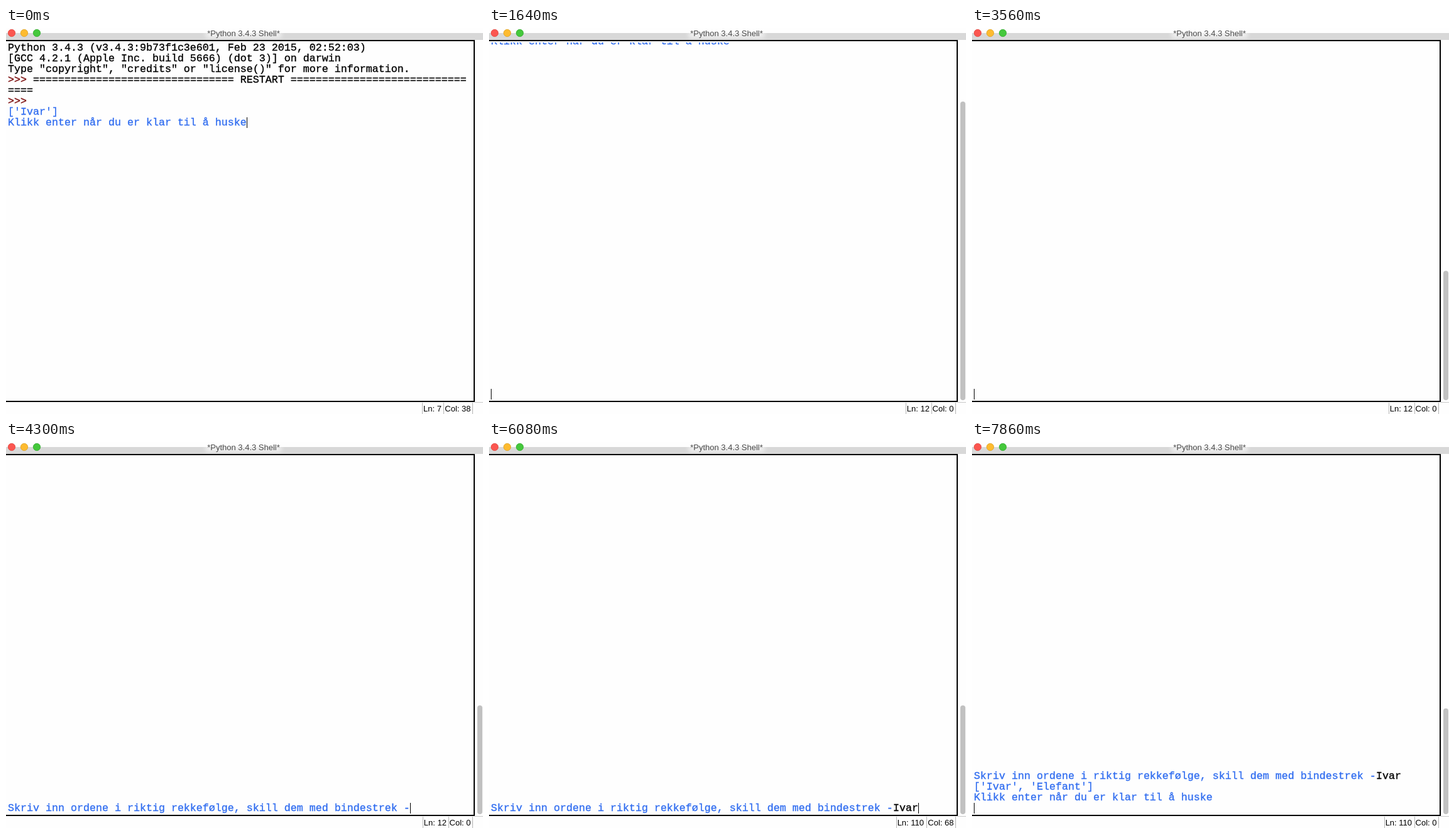
These frames come from a looping animation (759 by 614 pixels, 8 s). An HTML page:

```html
<!DOCTYPE html>
<html lang="no">
<head>
<meta charset="utf-8">
<title>Python Shell</title>
<style>
  html, body { margin: 0; width: 100%; height: 100%; overflow: hidden; background: #fefefe; }
  svg { display: block; width: 759px; height: 614px; }
  text { white-space: pre; }
  .mono { font: 16.667px "Liberation Mono", monospace; stroke-width: .35px; }
  .ui { font: 13px "Liberation Sans", sans-serif; }
  .black { fill: #000; stroke: #000; }
  .red { fill: #7d1010; stroke: #7d1010; }
  .blue { fill: #306df0; stroke: #306df0; }
</style>
</head>
<body>
<svg viewBox="0 0 759 614">
  <defs>
    <clipPath id="view"><rect x="0" y="23" width="743" height="569"/></clipPath>
    <filter id="soft" x="-10%" y="-60%" width="120%" height="220%"><feGaussianBlur stdDeviation="3"/></filter>
  </defs>
  <rect width="759" height="614" fill="#fefefe"/>
  <rect y="8" width="759" height="11" fill="#d8d8d8"/>
  <rect x="318" y="5" width="120" height="11" fill="#fff" opacity=".6" filter="url(#soft)"/>
  <circle cx="9" cy="8" r="5.7" fill="#fb5650" stroke="#e0443e" stroke-width=".8"/>
  <circle cx="29" cy="8" r="5.7" fill="#fdbb30" stroke="#dea123" stroke-width=".8"/>
  <circle cx="49" cy="8" r="5.7" fill="#45c83c" stroke="#2fa92b" stroke-width=".8"/>
  <text class="ui" x="378" y="13" text-anchor="middle" fill="#4a4a4a">*Python 3.4.3 Shell*</text>
  <path d="M0 20H745V594H0" fill="none" stroke="#000" stroke-width="2"/>
  <path d="M746 595.5H759" stroke="#c8c8c8"/>
  <g clip-path="url(#view)">
    <g id="page"></g>
  </g>
  <rect id="thumb" x="750" width="8" rx="4" fill="#c1c1c1"/>
  <path id="cells" fill="none" stroke="#b4b4b4"/>
  <text id="ln" class="ui" y="610"></text>
  <text id="col" class="ui" y="610"></text>
</svg>
<script>
const LOOP = 8000, STEP = 148.1;
const LEFT = 3, TOP = 23, CHAR = 10, ROW = 17, LAST_ROW = 574;
const NAME = "Ivar";
const ASK = "Klikk enter når du er klar til å huske";
const PROMPT = "Skriv inn ordene i riktig rekkefølge, skill dem med bindestrek -";
const PROMPT_ROW = 109;

const $ = id => document.getElementById(id);
const page = $("page");

function make(tag, attrs) {
  const el = document.createElementNS("http://www.w3.org/2000/svg", tag);
  for (const key in attrs) el.setAttribute(key, attrs[key]);
  return page.appendChild(el);
}

function write(row, color, str, col = 0) {
  const el = make("text", {
    class: "mono " + color, x: LEFT + col * CHAR, y: TOP + 13 + row * ROW
  });
  el.textContent = str;
  return el;
}

const show = (el, on) => el.setAttribute("visibility", on ? "visible" : "hidden");

write(0, "black", "Python 3.4.3 (v3.4.3:9b73f1c3e601, Feb 23 2015, 02:52:03)");
write(1, "black", "[GCC 4.2.1 (Apple Inc. build 5666) (dot 3)] on darwin");
write(2, "black", 'Type "copyright", "credits" or "license()" for more information.');
write(3, "red", ">>>");
write(3, "black", "=".repeat(32) + " RESTART " + "=".repeat(28), 4);
write(4, "black", "====");
write(5, "red", ">>>");
write(6, "blue", `['${NAME}']`);
write(7, "blue", ASK);

const prompt = write(PROMPT_ROW, "blue", PROMPT);
const answer = write(PROMPT_ROW, "black", "", PROMPT.length);
const list = write(PROMPT_ROW + 1, "blue", `['${NAME}', 'Elefant']`);
const askAgain = write(PROMPT_ROW + 2, "blue", ASK);
const caret = make("rect", { width: 1, height: ROW, fill: "#000" });

// Last [step, value] pair whose step has been reached
const pick = (k, pairs) => pairs.filter(p => p[0] <= k).pop()[1];

// Number of rows on the page: the program prints blank lines at a steady rate
function rowCount(k) {
  if (k < 6) return 8;
  if (k < 9) return 12 + Math.round((k - 6) * 19 / 3);
  if (k < 11) return 31 + (k - 9) * 5;
  if (k < 29) return 41 + (k - 11) * 4;
  return pick(k, [[29, 110], [43, 111], [44, 112], [53, 113]]);
}

function drawStatus(line, col) {
  const ln = "Ln: " + line, cl = "Col: " + col;
  const colX = 739.5 - 26.73 - 7.23 * String(col).length;
  const split = Math.round(colX - 2);
  const lnX = split - 3 - 21.68 - 7.23 * String(line).length;
  const edge = Math.round(lnX - 2);
  $("ln").textContent = ln;
  $("ln").setAttribute("x", lnX);
  $("col").textContent = cl;
  $("col").setAttribute("x", colX);
  $("cells").setAttribute("d", [edge, split, 742].map(x => `M${x + .5} 596V614`).join(""));
}

function draw(t) {
  const k = Math.floor((t + 5) / STEP);
  const rows = rowCount(k);
  const scroll = Math.max(0, TOP + (rows - 1) * ROW - LAST_ROW);
  page.setAttribute("transform", `translate(0 ${-scroll})`);

  const typed = pick(k, [[0, 0], [34, 1], [36, 2], [39, 3], [40, 4]]);
  answer.textContent = NAME.slice(0, typed);
  show(prompt, k >= 29);
  show(list, k >= 43);
  show(askAgain, k >= 44);

  const col = pick(k, [
    [0, ASK.length], [6, 0], [29, PROMPT.length + typed], [43, 0], [44, ASK.length], [53, 0]
  ]);
  const typing = k >= 34 && k < 43;
  caret.setAttribute("x", LEFT + col * CHAR);
  caret.setAttribute("y", TOP + (rows - 1) * ROW);
  show(caret, typing || (k % 6 !== 1 && k % 6 !== 2));

  const thumbY = 7.6 + 591 * scroll / (scroll + 568);
  $("thumb").setAttribute("y", thumbY);
  $("thumb").setAttribute("height", 592 - thumbY);
  show($("thumb"), scroll > 0);

  drawStatus(
    pick(k, [[0, 7], [6, 12], [35, 110]]),
    pick(k, [[0, 38], [6, 0], [35, 65], [37, 66], [40, 67], [41, 68], [44, 0]])
  );
}

const start = performance.now();
function tick(now) {
  draw(Math.max(0, now - start) % LOOP);
  requestAnimationFrame(tick);
}
draw(0);
requestAnimationFrame(tick);
</script>
</body>
</html>
```
